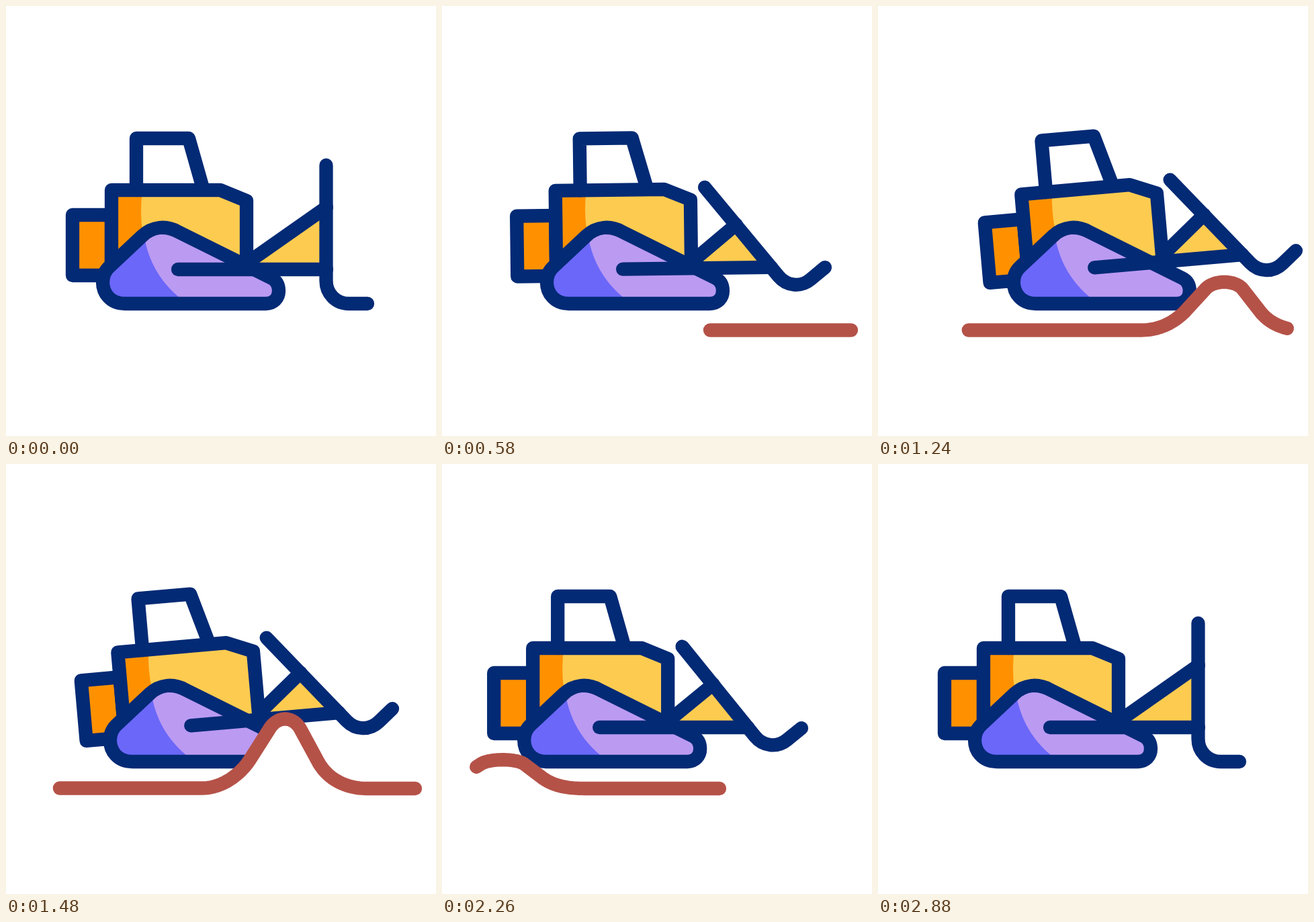
An HTML page with a canvas for the animation above (3.6 s loop, 640 by 640 pixels).

```html
<!DOCTYPE html>
<html lang="en">
<head>
<meta charset="utf-8">
<title>Bulldozer</title>
<style>
  html, body { margin: 0; width: 100%; height: 100%; overflow: hidden; background: #fff; }
  canvas { display: block; width: 100vw; height: 100vh; }
</style>
</head>
<body>
<canvas id="stage" width="640" height="640"></canvas>
<script>
const ctx = document.getElementById('stage').getContext('2d');
const LOOP = 3600, REST = 2880, STEP = 20, DEG = Math.PI / 180;
const NAVY = '#032a75', ORANGE = '#ff9100', YELLOW = '#fdcb50';
const LILAC = '#bb9af2', VIOLET = '#6b67f9', EARTH = '#b55248';
const BODY_PIVOT = [229, 295], BLADE_PIVOT = [477, 391.5];
const BASE = 482.5, SPEED = 150 / 360, PATH_START = 24, PATH_END = 738;

const shapes = {
  rear: new Path2D('M99 311H157V401H99Z'),
  hull: new Path2D('M157 388V274H319L358 290V388'),
  hullShade: new Path2D('M157 388V274H203Q199 305 203 335V388Z'),
  cab: new Path2D('M194 274V197H272L293 271'),
  tread: new Path2D('M177 443C155 443 144 427 144 411C144 401 148 393 155 387L203 342' +
    'C218 328 238 326 256 336L395 405C403 409 406 416 406 424C406 435 398 443 387 443Z'),
  treadShade: new Path2D('M130 450V330H204Q211 402 270 443V450Z'),
  arm: new Path2D('M256 392H477'),
  blade: new Path2D('M476.5 237V409C476.5 428 491 443 510 443H538')
};

const clamp = u => Math.min(1, Math.max(0, u));

function ease(t, from, to) {
  const u = clamp((t - from) / (to - from));
  return u * u * (3 - 2 * u);
}

const drive = t => 62 * ease(t, 400, 1040) - 128 * ease(t, 1160, 1900) + 66 * ease(t, 1900, 2485);
const tilt = t => -5 * DEG * (ease(t, 400, 1160) - ease(t, 1760, 2250));
const swing = t => ease(t, 0, 400) - ease(t, 2470, 2870);
const hill = t => ease(t, 860, 1460) - ease(t, 1924, 2524);
const scroll = t => SPEED * (t - 1480);

// Visible part of the ground path, in path coordinates
const tail = t => PATH_START + (PATH_END - PATH_START) * clamp((t - 1100) / (REST - 1100)) ** 1.65;
const head = t => Math.min(PATH_END, scroll(t) + 609 - 0.105 * Math.max(0, t - 1480));

function fill(path, color) {
  ctx.fillStyle = color;
  ctx.fill(path);
}

function line(path, color = NAVY) {
  ctx.strokeStyle = color;
  ctx.stroke(path);
}

function rotate([x, y], angle) {
  ctx.translate(x, y);
  ctx.rotate(angle);
  ctx.translate(-x, -y);
}

function drawHull() {
  fill(shapes.rear, ORANGE);
  line(shapes.rear);
  fill(shapes.hull, YELLOW);
  fill(shapes.hullShade, ORANGE);
  line(shapes.cab);
  line(shapes.hull);
}

function drawTread() {
  fill(shapes.tread, LILAC);
  ctx.save();
  ctx.clip(shapes.tread);
  fill(shapes.treadShade, VIOLET);
  ctx.restore();
  line(shapes.tread);
}

function drawBlade(amount) {
  const angle = -39 * DEG * amount, reach = 92 - 10 * amount;
  const [px, py] = BLADE_PIVOT;
  const strut = new Path2D();
  strut.moveTo(358, 383);
  strut.lineTo(px + reach * Math.sin(angle), py - reach * Math.cos(angle));
  const web = new Path2D(strut);
  web.lineTo(px, py);
  web.lineTo(358, py);
  fill(web, YELLOW);
  line(strut);
  line(shapes.arm);
  ctx.save();
  rotate(BLADE_PIVOT, angle);
  line(shapes.blade);
  ctx.restore();
}

function bezier(p, a, b, q, steps = 24) {
  return Array.from({ length: steps + 1 }, (_, i) => {
    const u = i / steps, v = 1 - u;
    return [0, 1].map(k =>
      v * v * v * p[k] + 3 * v * v * u * a[k] + 3 * v * u * u * b[k] + u * u * u * q[k]);
  });
}

// The hill grows out of the flat line and is wider while low
function terrain(rise) {
  const spread = 15 * (1 - rise);
  const left = (x, y) => [x - spread, BASE - rise * (BASE - y)];
  const right = (x, y) => [x + spread, BASE - rise * (BASE - y)];
  return [
    [PATH_START, BASE],
    ...bezier([292, BASE], [321, BASE], left(348, 463), left(363, 440)),
    ...bezier(left(391, 396), left(403, 374), right(428, 374), right(439, 396)),
    ...bezier(right(465, 444), right(479, 469), [506, 483], [537, 483]),
    [PATH_END, 483]
  ];
}

function heightAt(points, x) {
  const i = Math.max(1, points.findIndex(p => p[0] >= x));
  const [a, b] = [points[i - 1], points[i]];
  return a[1] + (b[1] - a[1]) * (x - a[0]) / (b[0] - a[0]);
}

function drawGround(t) {
  const from = tail(t), to = head(t), shift = scroll(t);
  if (to - from < 0.5) return;
  const points = terrain(hill(t));
  const ridge = new Path2D();
  ridge.lineTo(from - shift, heightAt(points, from));
  for (const [x, y] of points) if (x > from && x < to) ridge.lineTo(x - shift, y);
  ridge.lineTo(to - shift, heightAt(points, to));
  const mound = new Path2D(ridge);
  mound.lineTo(to - shift, BASE);
  mound.lineTo(from - shift, BASE);
  fill(mound, '#fff');
  line(ridge, EARTH);
}

function draw(t) {
  ctx.fillStyle = '#fff';
  ctx.fillRect(0, 0, 640, 640);
  ctx.lineWidth = 20.3;
  ctx.lineCap = ctx.lineJoin = 'round';

  ctx.save();
  ctx.translate(drive(t), 0);
  ctx.save();
  rotate(BODY_PIVOT, tilt(t));
  drawHull();
  ctx.restore();
  drawTread();
  rotate(BODY_PIVOT, tilt(t));
  drawBlade(swing(t));
  ctx.restore();

  drawGround(t);
}

const start = performance.now();
function frame() {
  const t = Math.max(0, performance.now() - start) % LOOP;
  draw(Math.min(REST, Math.floor(t / STEP) * STEP));
  requestAnimationFrame(frame);
}
frame();
</script>
</body>
</html>
```
